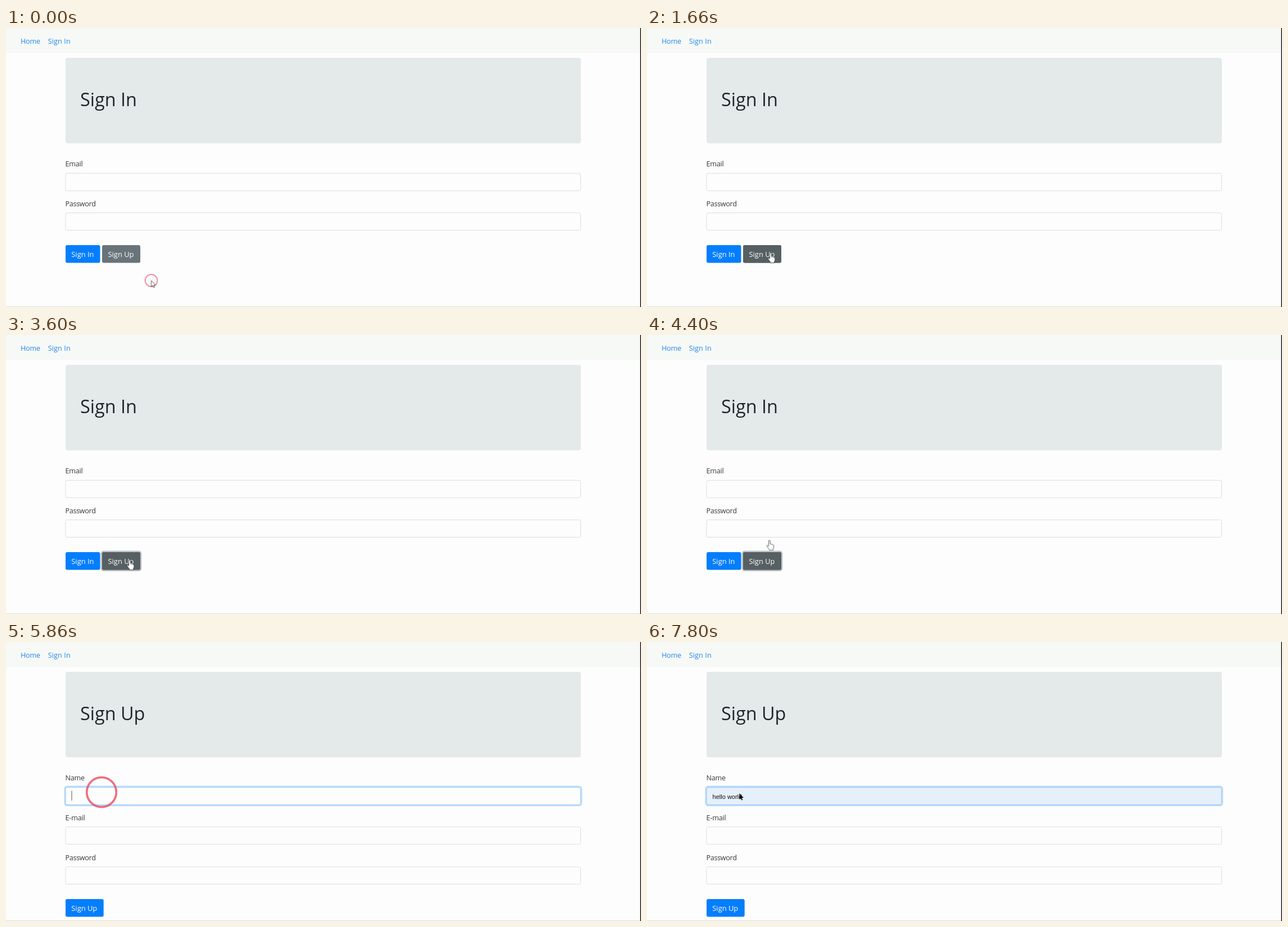
These frames come from a looping animation (1130 px wide and 496 px high, 8 s). An HTML page:

```html
<!DOCTYPE html>
<html lang="en">
<head>
<meta charset="utf-8">
<title>Sign in and sign up</title>
<style>
html, body { margin: 0; width: 100%; height: 100%; overflow: hidden; background: #fdfdfd; }
svg { display: block; width: 1130px; height: 496px; }
text { font: 12.6px "Open Sans", "Noto Sans", sans-serif; fill: #34383b; }
.tight { letter-spacing: -.2px; }
.tighter { letter-spacing: -.32px; }
.link { fill: #2387ea; }
.title { font-size: 32.4px; font-weight: 500; fill: #212529; }
.label { font-size: 12.9px; fill: #fff; }
.field { fill: #fdfdfd; stroke: #dadde1; }
.blue { fill: #057efd; }
.gray { fill: #69747a; }

/* Hard switches, all on the same 8 s clock */
.sw { animation: 8s step-end infinite; }
.signin { animation-name: signin; }
.signup { animation-name: signup; }
.hover-in { fill: #046bd6; animation-name: hoverIn; }
.hover-up { fill: #565f62; animation-name: hoverUp; }
.halo { fill: #bfc4c7; animation-name: halo; }
.focus { animation-name: focus; }
.caret { stroke: #555; animation-name: caret; }
.preview { animation-name: preview; }
.preview text { font: 11px "Liberation Sans", Arial, sans-serif; fill: #111; }
.arrow { animation-name: arrow; }
.hand { animation-name: hand; }
.black { animation-name: black; }

@keyframes signin { 0% { opacity: 1 } 58.2%, 100% { opacity: 0 } }
@keyframes signup { 0% { opacity: 0 } 58.2%, 100% { opacity: 1 } }
@keyframes hoverIn { 0% { opacity: 0 } 11.6% { opacity: 1 } 15%, 100% { opacity: 0 } }
@keyframes hoverUp { 0% { opacity: 0 } 15%, 100% { opacity: 1 } }
@keyframes halo { 0% { opacity: 0 } 24.1%, 100% { opacity: 1 } }
@keyframes focus { 0% { opacity: 0 } 72.4%, 100% { opacity: 1 } }
@keyframes caret { 0% { opacity: 0 } 72.4% { opacity: 1 } 78.2% { opacity: 0 } 82.5% { opacity: 1 } 88.2%, 100% { opacity: 0 } }
@keyframes preview { 0% { opacity: 0 } 88.2%, 100% { opacity: 1 } }
@keyframes arrow { 0% { opacity: 1 } 11.6% { opacity: 0 } 64.2% { opacity: 1 } 66.6%, 100% { opacity: 0 } }
@keyframes hand { 0% { opacity: 0 } 11.6% { opacity: 1 } 64.2%, 100% { opacity: 0 } }
@keyframes black { 0% { opacity: 0 } 90.7%, 100% { opacity: 1 } }

/* Pointer path and click rings */
.pointer { animation: path 8s linear infinite; }
@keyframes path {
  0%, 7.5% { transform: translate(258.5px, 449px) }
  12.5%, 14.1% { transform: translate(148.5px, 411.5px) }
  17.5%, 20.4% { transform: translate(219px, 400px) }
  20.8%, 51.6% { transform: translate(220px, 400.5px) }
  54.9%, 64.1% { transform: translate(217.7px, 365.5px) }
  66.6%, 93.2% { transform: translate(170px, 267px) }
  96.6%, 100% { transform: translate(164.3px, 269px) }
}
.ring { fill: none; stroke: #e8475a; stroke-width: 3.7; opacity: .78; animation: ring 8s linear infinite; }
@keyframes ring {
  0%, .7% { transform: scale(.41) }
  1.2%, 24.1% { transform: scale(0) }
  25.8% { transform: scale(1) }
  27.5%, 71.5% { transform: scale(0) }
  73%, 73.6% { transform: scale(1) }
  75%, 100% { transform: scale(0) }
}
</style>
</head>
<body>
<svg viewBox="0 0 1130 496">
  <defs>
    <rect id="input" x="106" y="0" width="916.5" height="31" rx="3"/>
    <path id="tip" d="M0 0V11L2.5 8.8 4.2 12.6 6 11.8 4.4 8.1H7.8Z"/>
  </defs>

  <rect width="1130" height="496" fill="#fdfdfd"/>
  <rect width="1130" height="45" fill="#f7f9f7"/>
  <text class="link tight" x="26" y="28">Home</text>
  <text class="link" x="74.8" y="28" letter-spacing=".1">Sign In</text>
  <rect x="106" y="53" width="917" height="152" rx="4" fill="#e4eae9"/>
  <use href="#input" class="field" y="258.3"/>
  <use href="#input" class="field" y="328.6"/>

  <g class="sw signin">
    <text class="title" x="132" y="139">Sign In</text>
    <text class="tight" x="105.5" y="246">Email</text>
    <text class="tighter" x="105.5" y="317">Password</text>
    <rect class="blue" x="106" y="386" width="61.5" height="31.5" rx="3"/>
    <rect class="sw hover-in" x="106" y="386" width="61.5" height="31.5" rx="3"/>
    <text class="label" x="116.3" y="407">Sign In</text>
    <rect class="sw halo" x="168.6" y="383.6" width="72.8" height="36.3" rx="5"/>
    <rect class="gray" x="171" y="386" width="68" height="31.5" rx="3"/>
    <rect class="sw hover-up" x="171" y="386" width="68" height="31.5" rx="3"/>
    <text class="label" x="181.5" y="407">Sign Up</text>
  </g>

  <g class="sw signup">
    <text class="title" x="132" y="139">Sign Up</text>
    <text class="tight" x="105.5" y="246">Name</text>
    <text class="tight" x="105.5" y="317">E-mail</text>
    <text class="tighter" x="105.5" y="388">Password</text>
    <use href="#input" class="field" y="399.6"/>
    <rect class="blue" x="106" y="457" width="67.7" height="31.5" rx="3"/>
    <text class="label" x="116.3" y="478">Sign Up</text>
    <g class="sw focus">
      <rect x="104.6" y="256.8" width="919.4" height="34" rx="4.5" fill="none" stroke="#bfdefd" stroke-width="2.6"/>
      <use href="#input" y="258.3" fill="#fdfdfd" stroke="#93c6fb"/>
    </g>
    <path class="sw caret" d="M117 264.5V282"/>
    <g class="sw preview">
      <use href="#input" y="258.3" fill="#e6f0fb" stroke="#93c6fb"/>
      <text x="116.6" y="279">hello world</text>
    </g>
  </g>

  <path d="M0 495.5H1130" stroke="#dcdcdc"/>
  <rect x="1128.6" width="1.4" height="496" fill="#111"/>

  <g class="pointer">
    <circle class="ring" r="26.3"/>
    <use href="#tip" class="sw arrow" fill="#fff" stroke="#444" stroke-width=".9"/>
    <path class="sw hand" fill="#fff" stroke="#4a4a4a" stroke-width=".9" d="M-1.4 10V1a1.4 1.4 0 0 1 2.8 0V6.2q2.2-.9 2.4.6 2.2-.6 2.3.8 1.7-.3 1.7 1V11.5q0 2-1.4 3.5V17H0v-1.2Q-2.6 13-4.4 9.8-4.6 8-3 8.4z"/>
    <use href="#tip" class="sw black" fill="#111"/>
  </g>
</svg>
</body>
</html>
```
